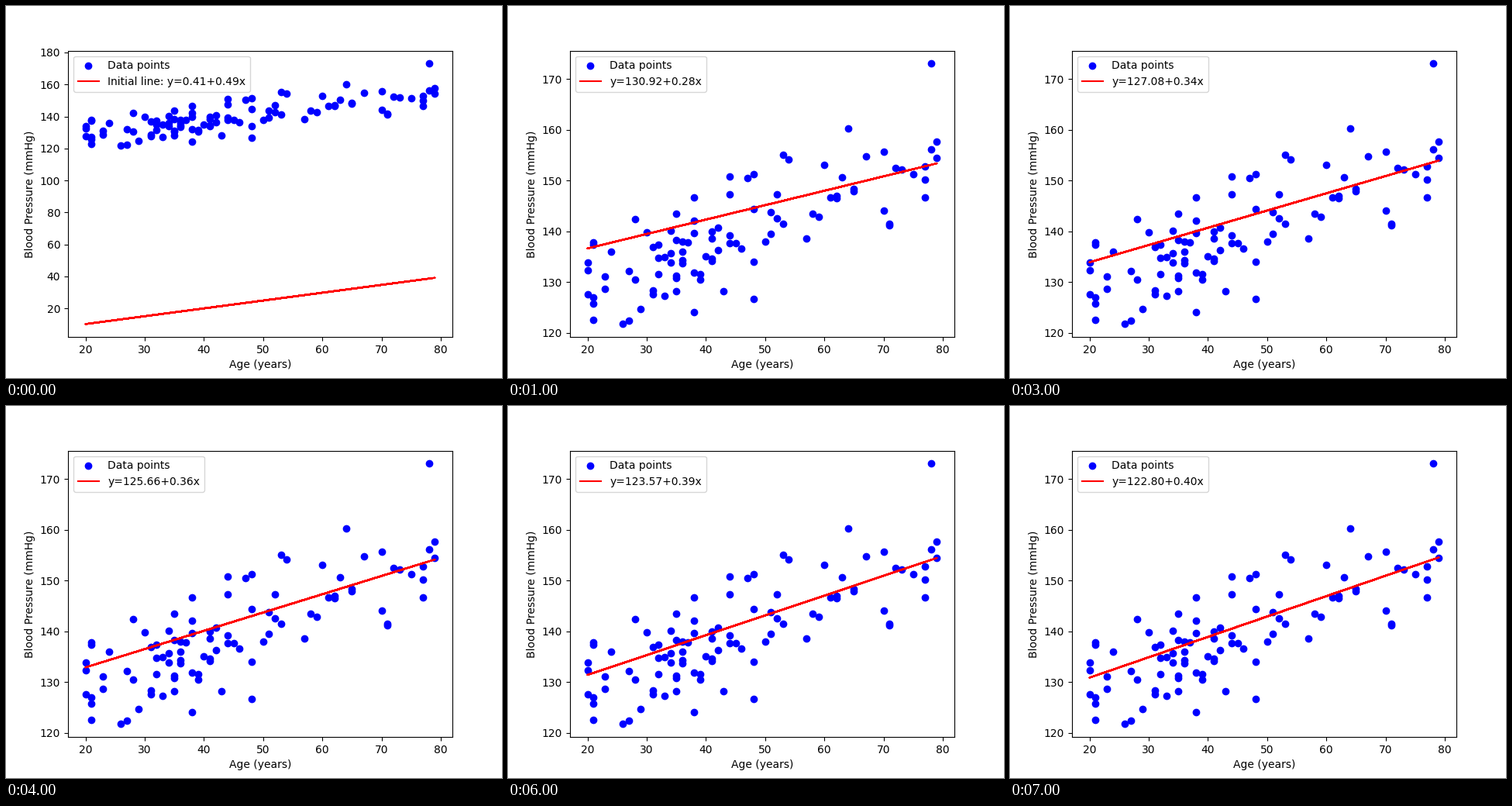
Recreate the animation shown at these times as a matplotlib script. Size 640x480 px, loop 8000 ms.

```python
import numpy as np
import matplotlib.pyplot as plt
from matplotlib.animation import FuncAnimation

STEPS = 8
INTERVAL = 1000

# Blood pressure readings for every sampled age, youngest first
UNSAMPLED = {22, 25, 49, 55, 56, 66, 68, 69, 74, 76}
AGES = [a for a in range(20, 80) if a not in UNSAMPLED]
READINGS = [
    (133.8, 132.3, 127.5), (137.8, 137.3, 127.0, 125.8, 122.6),
    (131.0, 128.7), (136.0,), (121.7,), (132.1, 122.3), (142.4, 130.4),
    (124.6,), (139.8,), (136.8, 128.4, 127.6), (137.4, 134.7, 131.6),
    (134.9, 127.2), (140.1, 135.7, 133.8),
    (143.4, 138.3, 131.2, 130.7, 128.2), (138.0, 136.0, 134.3, 133.7),
    (137.8,), (146.7, 142.1, 139.6, 131.9, 124.1), (131.5, 130.4),
    (135.1,), (140.0, 138.5, 134.6, 134.1), (140.7, 136.3), (128.2,),
    (150.7, 147.3, 139.2, 137.6), (137.6,), (136.6,), (150.4,),
    (151.2, 144.4, 134.0, 126.7), (138.0,), (143.8, 139.5),
    (147.2, 142.6), (155.1, 141.4), (154.1,), (138.5,), (143.4,),
    (142.9,), (153.0,), (146.6,), (146.9, 146.5), (150.6,), (160.2,),
    (148.4, 147.9), (154.7,), (155.6, 144.0), (141.5, 141.2), (152.5,),
    (152.1,), (151.2,), (152.7, 150.1, 146.7), (173.0, 156.1),
    (157.7, 154.5),
]

points = np.array([(age, bp) for age, row in zip(AGES, READINGS) for bp in row])
# Samples are unsorted, so the fitted line runs back and forth over itself
points = np.random.default_rng(3).permutation(points)
x, y = points.T


def coefficients(step):
    """Intercept and slope, converging geometrically after the first guess."""
    if step == 0:
        return 0.41, 0.49
    intercept = 119.385 + 11.536 * 0.8165 ** (step - 1)
    slope = 0.284 + 0.0145 * (130.921 - intercept)
    return intercept, slope


fig, ax = plt.subplots(figsize=(6.4, 4.8), dpi=100)


def draw(step):
    a, b = coefficients(step)
    prefix = "Initial line: " if step == 0 else ""
    ax.clear()
    ax.scatter(x, y, color="blue", label="Data points")
    ax.plot(x, a + b * x, color="red", label=f"{prefix}y={a:.2f}+{b:.2f}x")
    ax.set_xlabel("Age (years)")
    ax.set_ylabel("Blood Pressure (mmHg)")
    ax.legend(loc="upper left")
    return ax.get_children()


anim = FuncAnimation(fig, draw, frames=STEPS, init_func=lambda: [],
                     interval=INTERVAL, repeat=True, repeat_delay=0)
plt.show()
```
